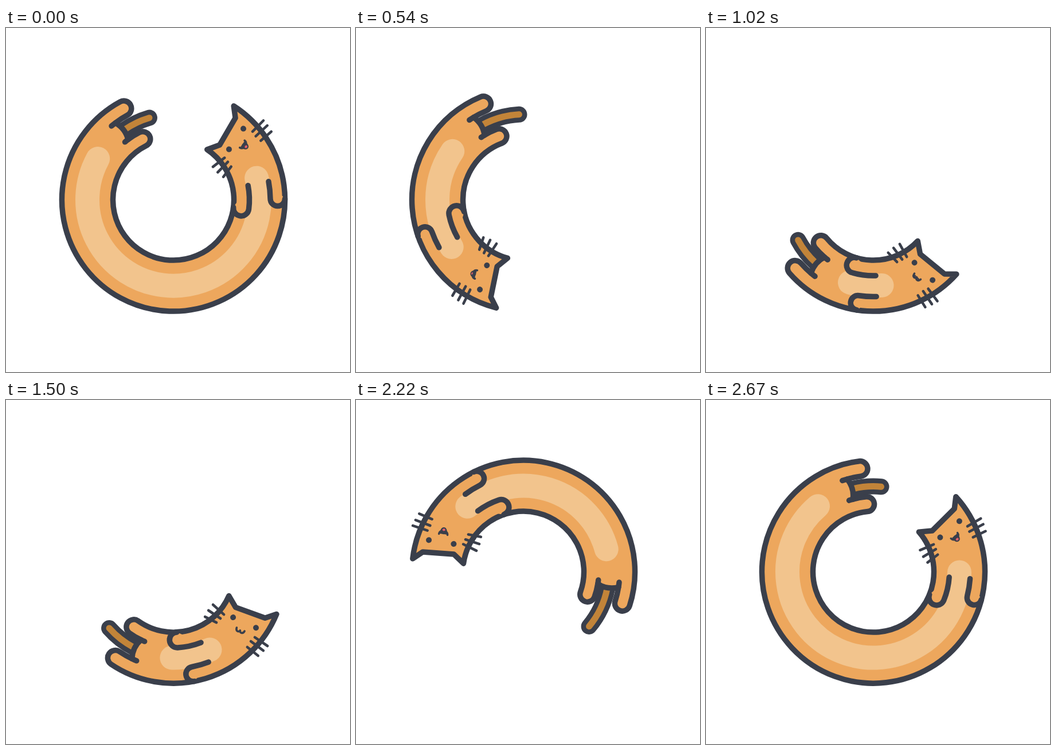
These frames come from a looping animation (600x600 px, 2700 ms). An HTML page:

```html
<!DOCTYPE html>
<html lang="en">
<head>
<meta charset="utf-8">
<title>Long cat loader</title>
<style>
  html, body { margin: 0; width: 100%; height: 100%; overflow: hidden; background: #fff; }
  svg { display: block; width: 100%; height: 100%; }
  path, g { stroke-linecap: round; stroke-linejoin: round; }
  .line { fill: none; stroke: #3a3f4b; stroke-width: 9.5; }
  .fur { fill: #eda75d; stroke: #3a3f4b; stroke-width: 9.5; }
</style>
</head>
<body>
<svg viewBox="0 0 600 600">
  <g transform="translate(292 299.6)">
    <path id="tailEdge" class="line" style="stroke-width:28"/>
    <path id="tail" fill="none" stroke="#c28439" stroke-width="11"/>
    <path id="body" class="fur"/>
    <path id="belly" fill="none" stroke="#f2c48d" stroke-width="42"/>
    <path id="notches" class="line"/>
    <path id="pawOut" class="fur"/>
    <path id="pawIn" class="fur"/>
    <g id="face">
      <g fill="#3a3f4b">
        <circle cx="173.9" cy="-4.9" r="5"/>
        <circle cx="130.9" cy="3.7" r="5"/>
      </g>
      <path class="line" style="stroke-width:4.6" d="M182 9.9L208.8 9.1M180.5 19.6L207.7 20M181.3 31.3L205.4 32.5
        M89.6 6.3L115 9M89 19L114.2 18.1M90.6 31.5L112.6 28"/>
      <g transform="translate(154 14) rotate(-12)">
        <g id="mouth">
          <path d="M-4.6 1C-5.5 13 5.5 13 4.6 1Z" fill="#3a3f4b" stroke="#3a3f4b" stroke-width="3"/>
          <ellipse cy="6.3" rx="2.6" ry="3" fill="#e2606a"/>
        </g>
        <path class="line" style="stroke-width:3.6" d="M-7.5 -1C-7 5 -1 6 0 1C1 6 7 5 7.5 -1"/>
      </g>
    </g>
  </g>
</svg>
<script>
const LOOP = 2700, STEP = 30;
const OUT = 194.5, IN = 105.5, MID = 150;
const $ = id => document.getElementById(id);

// Monotone cubic track through [time, value] knots; gains `turn` on every loop.
function track(turn, knots) {
  const n = knots.length;
  const at = i => {
    const k = Math.floor(i / n), [t, v] = knots[i - k * n];
    return [t + k * LOOP, v + k * turn];
  };
  const step = i => at(i + 1)[0] - at(i)[0];
  const rate = i => (at(i + 1)[1] - at(i)[1]) / step(i);
  const slope = i => {
    const a = rate(i - 1), b = rate(i);
    if (a * b <= 0) return 0;
    const u = 2 * step(i) + step(i - 1), w = step(i) + 2 * step(i - 1);
    return (u + w) / (u / a + w / b);
  };
  return t => {
    let i = 0;
    while (i < n - 1 && at(i + 1)[0] <= t) i++;
    const h = step(i), s = (t - at(i)[0]) / h, q = 1 - s;
    return at(i)[1] * q * q * (1 + 2 * s) + at(i + 1)[1] * s * s * (3 - 2 * s)
      + h * s * q * (slope(i) * q - slope(i + 1) * s);
  };
}

// Angles in degrees, clockwise from the right.
const headAt = track(-720, [[0, -43.85], [540, -242.5], [1020, -304.75], [1500, -324.25],
  [1620, -340], [1980, -425.7], [2160, -493.4], [2220, -519.85], [2670, -748.9]]);
const rumpAt = track(-720, [[0, 230], [540, -124.1], [1020, -232.65], [1080, -235.7],
  [1500, -247.5], [1980, -304.4], [2220, -353.75], [2670, -468.8]]);
const tailAt = track(0, [[0, 23.6], [540, 31.2], [1020, 24.5], [1500, 26.2],
  [1980, 32.1], [2220, 33.5], [2670, 24]]);
const mouthAt = track(0, [[0, 1], [540, .8], [1020, .25], [1500, 0], [1980, .55], [2220, 1], [2670, 1]]);

function pt(r, deg) {
  const a = deg * Math.PI / 180;
  return (r * Math.cos(a)).toFixed(2) + ' ' + (r * Math.sin(a)).toFixed(2);
}
const move = (r, a) => 'M' + pt(r, a);
const line = (r, a) => 'L' + pt(r, a);
const sweep = (r, a, b) => `A${r} ${r} 0 ${+(Math.abs(b - a) > 180)} ${+(b > a)} ${pt(r, b)}`;
const arc = (r, a, b) => move(r, a) + sweep(r, a, b);
const cap = (from, to, a) => {
  const r = Math.abs(to - from) / 2;
  return `A${r} ${r} 0 0 ${+(to < from)} ${pt(to, a)}`;
};

function draw(t) {
  const h = headAt(t), e = rumpAt(t), tip = e + tailAt(t), open = mouthAt(t);
  const set = (id, d) => $(id).setAttribute('d', d);

  set('tailEdge', arc(149, e + 5, tip));
  set('tail', arc(149, e + 5, tip));
  set('body',
    arc(OUT, h - 13.4, e + 11.5) + cap(OUT, 168, e + 11.5) + sweep(168, e + 11.5, e + 3)
    + `Q${pt(149, e + 6)} ${pt(131.5, e + 3)}`
    + sweep(131.5, e + 3, e + 13.3) + cap(131.5, IN, e + 13.3) + sweep(IN, e + 13.3, h - 12.3)
    + line(125, h - 6) + line(179, h - 9) + 'Z');
  set('notches', arc(168, e + 3, e) + arc(131.5, e + 3, e));
  set('belly', arc(MID, h + 29.2, e - 21.5));
  set('pawOut', arc(169, h + 33, h + 43.3) + cap(169, OUT, h + 43.3));
  set('pawIn', arc(132.5, h + 33, h + 51) + cap(132.5, IN, h + 51));
  $('face').setAttribute('transform', `rotate(${h.toFixed(2)})`);
  $('mouth').setAttribute('transform', `scale(1 ${open.toFixed(3)})`);
  $('mouth').style.display = open > .05 ? '' : 'none';
}

const start = performance.now();
function tick() {
  const t = (performance.now() - start) % LOOP;
  draw(Math.floor(t / STEP) * STEP);
  requestAnimationFrame(tick);
}
tick();
</script>
</body>
</html>
```
